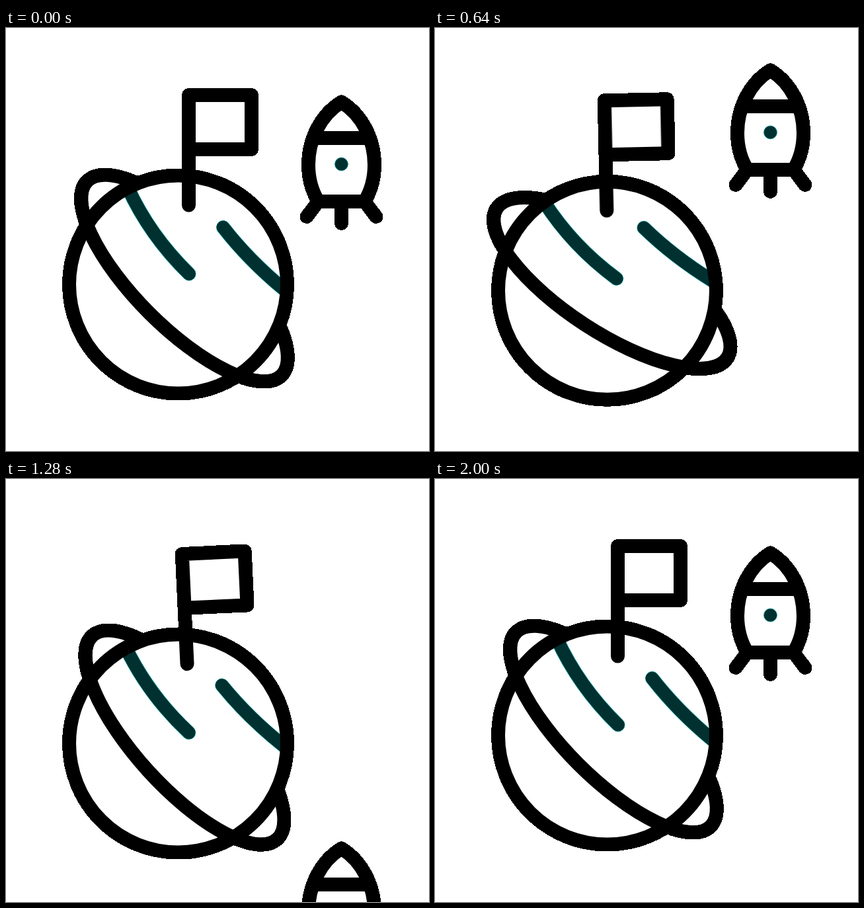
An HTML page that plays this animation: 640x640 px, repeating every 2040 ms.

```html
<!DOCTYPE html>
<html lang="en">
<head>
<meta charset="utf-8">
<title>Planet and rocket</title>
<style>
  html, body { margin: 0; width: 100%; height: 100%; overflow: hidden; background: #fff; }
  svg { display: block; width: 100vw; height: 100vh; }
  .line { fill: #fff; stroke: #000; stroke-width: 21; stroke-linecap: round; stroke-linejoin: round; }
  .open { fill: none; }
  .rim { stroke: #0c9c9a; }
  .teal { stroke: #003030; stroke-width: 19.6; }
</style>
</head>
<body>
<svg viewBox="0 0 640 640">
  <defs>
    <clipPath id="disc"><circle r="165"/></clipPath>
    <path id="stripes" d="M-76.5-147Q-43-74 16.5-16M68-86.5Q106.5-37 159.5 7"/>
    <!-- Hard outer silhouette, smooth edges inside -->
    <filter id="cutout" filterUnits="userSpaceOnUse" x="0" y="0" width="640" height="640"
            color-interpolation-filters="sRGB">
      <feComponentTransfer><feFuncA type="discrete" tableValues="0 1"/></feComponentTransfer>
    </filter>
  </defs>

  <g filter="url(#cutout)">
    <g id="planet" class="line">
      <g class="ring">
        <ellipse rx="208" ry="75" transform="translate(9.5 -9.5) rotate(45)"/>
      </g>
      <circle r="165" stroke="none"/>
      <g clip-path="url(#disc)">
        <g class="spin open">
          <use href="#stripes" class="rim"/>
          <use href="#stripes" class="teal"/>
        </g>
      </g>
      <circle r="165" class="open"/>
      <g class="ring open">
        <path d="M-208 0A208 75 0 0 0 208 0" transform="translate(9.5 -9.5) rotate(45)"/>
      </g>
      <g class="spin">
        <path id="flag" d="M0 0V-166.5H95V-84.5H0"/>
      </g>
    </g>

    <g id="rocket" class="line">
      <path d="M0-94C-32.5-74-50-36-50 1C-50 22-44.500 41-35 56.500H35C44.500 41 50 22 50 1C50-36 32.500-74 0-94Z"/>
      <path class="open" d="M-40-39.500H40M-35 56.500L-52.500 79.500M35 56.500L52.500 79.500M0 56.500V89.500"/>
      <circle r="10" class="rim" style="fill:#003030;stroke-width:.8"/>
    </g>
  </g>
</svg>
<script>
const LOOP = 2040, STEP = 40;

// Keys are [ms, value]; values ease in and out between neighbours.
const bob = [[173, 0], [916, 13.5], [1151, 13.5], [1785, 0]];
const spin = [[10, 0], [720, -8.2], [809, -8.2], [1427, 0]];
const sway = [[120, 0], [830, -5], [1400, 5.1], [1880, 0]];
const wave = [[60, 0], [440, -4.8], [760, 12], [1140, -3], [1420, 0]];
const dip = [[40, 0], [460, 29]];

function track(keys, t) {
  if (t <= keys[0][0]) return keys[0][1];
  for (let i = 1; i < keys.length; i++) {
    const [t0, v0] = keys[i - 1], [t1, v1] = keys[i];
    if (t < t1) {
      const p = (t - t0) / (t1 - t0);
      return v0 + (v1 - v0) * p * p * (3 - 2 * p);
    }
  }
  return keys[keys.length - 1][1];
}

// Dips, speeds off the top, then returns from below and slows down.
function rocketY(t) {
  if (t < 460) return track(dip, t);
  if (t < 1080) return 29 - 0.00238 * (t - 460) ** 2;
  return 84.5 * (Math.max(0, 2000 - t) / 320) ** 2.054;
}

const move = (selector, value) =>
  document.querySelectorAll(selector).forEach(el => el.setAttribute("transform", value));

function draw(now) {
  const t = Math.floor((now % LOOP) / STEP) * STEP;
  const turn = track(spin, t);
  move("#planet", `translate(260.5 ${388 + track(bob, t)})`);
  move(".spin", `rotate(${turn})`);
  move(".ring", `rotate(${turn + track(sway, t)})`);
  move("#flag", `translate(16 -120) rotate(${track(wave, t)})`);
  move("#rocket", `translate(507.5 ${206 + rocketY(t)})`);
}

const start = performance.now();
function tick() {
  draw(performance.now() - start);
  requestAnimationFrame(tick);
}
tick();
</script>
</body>
</html>
```
